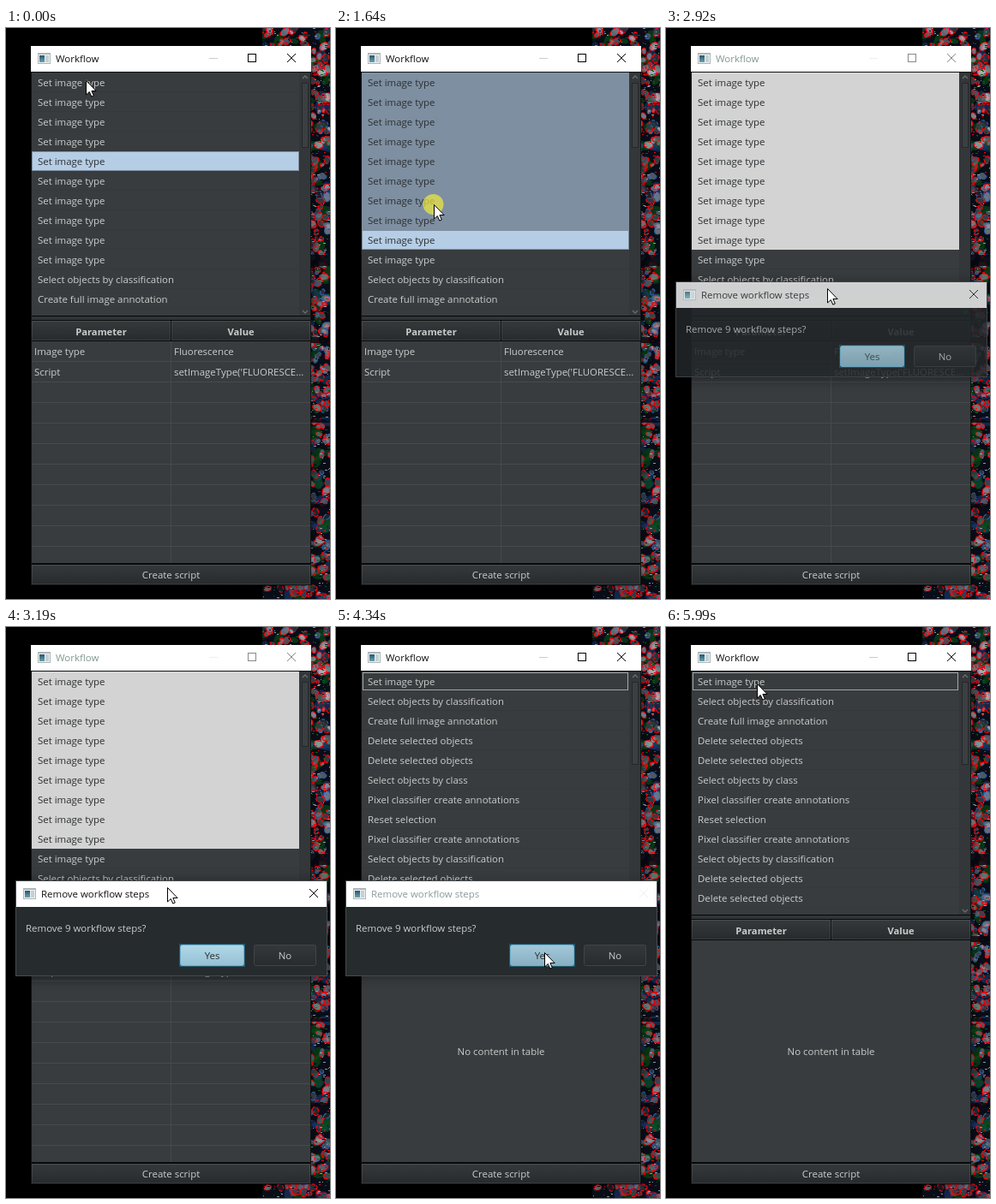
Recreate the animation shown at these times as an HTML page with a canvas. Size 378 px wide and 667 px high, loop 6030 ms.

```html
<!DOCTYPE html>
<html lang="en">
<head>
<meta charset="utf-8">
<title>Workflow</title>
<style>
html, body { margin: 0; width: 100%; height: 100%; overflow: hidden; background: #000; }
canvas { display: block; }
</style>
</head>
<body>
<canvas id="stage" width="378" height="667"></canvas>
<script>
const W = 378, H = 667, LOOP = 6030;
const ctx = document.getElementById('stage').getContext('2d');
const LIGHT = '#cbcccc', DARK = '#2c2f31', PANEL = '#383c3e';
const MUTED_BLUE = '#7e8fa1', BRIGHT_BLUE = '#b6cde6';

// Pointer positions [ms, x, y]; it moves in short steps between them.
const path = [
  [0, 93, 61], [140, 93, 61], [680, 111, 238], [1100, 111, 238], [1440, 114, 206],
  [2030, 114, 206], [2360, 184, 290], [2430, 187, 298], [2570, 187, 298], [2640, 188, 304],
  [3250, 188, 304], [3600, 226, 427], [3800, 236, 357], [3860, 236, 357], [4070, 243, 380],
  [4950, 243, 380], [5350, 191, 145], [5560, 221, 227], [5850, 92, 41], [5990, 106, 66], [6030, 106, 66]
];
const STEP = 67;
const clicks = [[140, 210], [880, 950], [1640, 1770], [2640, 2710], [4270, 4340]];

const remaining = [
  'Set image type', 'Select objects by classification', 'Create full image annotation',
  'Delete selected objects', 'Delete selected objects', 'Select objects by class',
  'Pixel classifier create annotations', 'Reset selection', 'Pixel classifier create annotations',
  'Select objects by classification', 'Delete selected objects', 'Delete selected objects',
  'Select objects by classification'
];
const initial = [...Array(9).fill('Set image type'), ...remaining].slice(0, 13);

const during = (t, from, to) => t >= from && t < to;
const clamp = v => Math.max(0, Math.min(1, v));

function pointerAt(t) {
  const i = path.findIndex(key => key[0] > t);
  const [t0, x0, y0] = path[i - 1], [t1, x1, y1] = path[i];
  const steps = Math.max(1, Math.round((t1 - t0) / STEP));
  const p = Math.floor((t - t0) / (t1 - t0) * steps) / steps;
  const e = p * p * (3 - 2 * p);
  return { x: Math.round(x0 + (x1 - x0) * e), y: Math.round(y0 + (y1 - y0) * e) };
}

function rect(x, y, w, h, fill) {
  ctx.fillStyle = fill;
  ctx.fillRect(x, y, w, h);
}

function frame(x, y, w, h, color) {
  ctx.strokeStyle = color;
  ctx.lineWidth = 1;
  ctx.strokeRect(x + .5, y + .5, w - 1, h - 1);
}

function line(color, width, ...points) {
  ctx.strokeStyle = color;
  ctx.lineWidth = width;
  ctx.beginPath();
  points.forEach(([x, y]) => ctx.lineTo(x, y));
  ctx.stroke();
}

function gradient(y, h, top, bottom) {
  const g = ctx.createLinearGradient(0, y, 0, y + h);
  g.addColorStop(0, top);
  g.addColorStop(1, bottom);
  return g;
}

function bevel(x, y, w, h) {
  rect(x, y, w, h, gradient(y, h, '#35393b', '#272b2d'));
  frame(x, y, w, h, gradient(y, h, '#4a4e50', '#373b3d'));
}

function label(text, x, middle, color = LIGHT, align = 'left', weight = '11.45px') {
  ctx.font = `${weight} "Open Sans", "Noto Sans", sans-serif`;
  ctx.textAlign = align;
  ctx.fillStyle = color;
  ctx.fillText(text, x, middle + 4);
}

function shadowed(x, y, w, h, fill, alpha, blur) {
  ctx.save();
  ctx.shadowColor = `rgba(0,0,0,${alpha})`;
  ctx.shadowBlur = blur;
  ctx.shadowOffsetY = 2;
  rect(x, y, w, h, fill);
  ctx.restore();
}

function closeCross(x, y, color) {
  line(color, 1, [x - 5, y - 5], [x + 5, y + 5]);
  line(color, 1, [x + 5, y - 5], [x - 5, y + 5]);
}

function appIcon(x, y) {
  rect(x, y, 15, 13, '#aeb6b9');
  rect(x + 1, y + 2, 13, 10, '#eef2f3');
  rect(x + 2, y + 3, 6, 8, gradient(y + 3, 8, '#28566f', '#69a3ad'));
  rect(x + 9, y + 3, 4, 8, '#c5d0d4');
}

// Fluorescence-like tissue in place of the picture behind the window.
function makeTissue() {
  const canvas = document.createElement('canvas');
  canvas.width = 79;
  canvas.height = H;
  const c = canvas.getContext('2d');
  let seed = 17;
  const random = (min, max) => {
    seed = (seed * 16807) % 2147483647;
    return min + (max - min) * seed / 2147483647;
  };
  const blob = (x, y, r, squash, fill) => {
    c.beginPath();
    c.ellipse(x, y, r, r * squash, random(0, 3), 0, 7);
    c.fillStyle = fill;
    c.fill();
  };
  c.fillStyle = '#080d18';
  c.fillRect(0, 0, 79, H);
  for (let i = 0; i < 260; i++)
    blob(random(0, 79), random(0, H), random(4, 10), .6, random(0, 1) < .55 ? '#08501499' : '#1b407c88');
  for (let i = 0; i < 640; i++) {
    const x = random(0, 79), y = random(0, H), r = random(2.5, 6);
    const v = Math.round(random(.15, y < 150 ? 1 : .75) * 225);
    blob(x, y, r, .7, `rgba(${v},${v + 8},${v + 20},.6)`);
    c.strokeStyle = random(0, 1) < .75 ? '#ff0008' : '#2f5da0';
    c.lineWidth = 1.2;
    c.setLineDash([random(3, 8), random(1, 5)]);
    c.stroke();
  }
  for (let i = 0; i < 1500; i++) {
    c.fillStyle = ['#ff0008', '#05080f', '#0b5a1a', '#8d99a6'][Math.floor(random(0, 4))];
    c.fillRect(Math.floor(random(0, 79)), Math.floor(random(0, H)), Math.ceil(random(0, 3)), 1);
  }
  for (const [y, h] of [[265, 13], [361, 7], [457, 4], [556, 4]]) {
    c.fillStyle = '#050810cc';
    c.fillRect(0, y, 79, h);
  }
  return canvas;
}
const tissue = makeTissue();

function drawTitleBar(active) {
  rect(29, 21, 327, 30, '#fff');
  appIcon(37, 29);
  label('Workflow', 58, 36, active ? '#111' : '#83988f');
  rect(237, 35, 10, 1, active ? '#ccc' : '#eee');
  const color = active ? '#000' : '#888';
  frame(282, 30, 10, 10, color);
  closeCross(333, 35, color);
}

function drawList(t, active, removed) {
  rect(30, 52, 325, 285, PANEL);
  const selectedTo = t < 880 ? 0 : 8;
  ctx.save();
  ctx.beginPath();
  ctx.rect(30, 52, 325, 285);
  ctx.clip();
  (removed ? remaining : initial).forEach((text, i) => {
    const y = 52 + 23 * i;
    const selected = !removed && (t < 140 ? i === 4 : i <= selectedTo);
    const focused = selected && i === (t < 140 ? 4 : selectedTo);
    if (selected) rect(30, y, 312, 23, active ? MUTED_BLUE : '#d3d3d3');
    else rect(30, y + 22, 312, 1, '#35393b');
    if (focused && active) rect(31, y + 1, 310, 21, BRIGHT_BLUE);
    label(text, 37, y + 12, selected ? DARK : LIGHT);
  });
  if (removed) frame(31, 53, 310, 21, '#a4a6a7');
  ctx.restore();

  rect(342, 52, 13, 285, '#333739');
  const thumb = removed ? 97 : 76;
  rect(345, 64, 8, thumb, '#3b3f41');
  frame(345, 64, 8, thumb, '#24282a');
  line('#686d70', 1.3, [346, 59], [349, 56], [352, 59]);
  line('#686d70', 1.3, [346, 330], [349, 333], [352, 330]);
}

function drawTable(removed) {
  rect(29, 336, 327, 1, '#050505');
  rect(29, 337, 327, 4, '#313537');
  rect(29, 341, 327, 25, '#080909');
  for (const [x, w, text] of [[30, 162, 'Parameter'], [193, 162, 'Value']]) {
    bevel(x, 342, w, 23);
    label(text, x + w / 2, 355, LIGHT, 'center', 'bold 11.2px');
  }
  rect(30, 366, 325, 260, PANEL);
  if (removed) label('No content in table', 192.5, 496, LIGHT, 'center');
  else {
    for (let y = 389; y < 626; y += 24) rect(30, y, 325, 1, '#464a4c');
    rect(192, 366, 1, 260, '#464a4c');
    label('Image type', 33, 378);
    label('Fluorescence', 196, 378);
    label('Script', 33, 402);
    label("setImageType('FLUORESCE...", 196, 402);
  }
  rect(29, 625, 327, 2, '#080909');
  bevel(30, 627, 325, 23);
  label('Create script', 192.5, 639, LIGHT, 'center');
}

function drawMenu(pointer) {
  shadowed(114, 206, 140, 114, '#363a3c', .6, 9);
  frame(114, 206, 140, 114, '#26292b');
  const items = [
    ['Copy commands', 211], ['Move up', 238], ['Move down', 263], ['Remove selected items', 291]
  ];
  for (const [text, y] of items) {
    const hover = pointer.y >= y && pointer.y <= y + 27 && (pointer.y < y + 25 || y === 263);
    if (hover) rect(115, y, 138, 26, MUTED_BLUE);
    label(text, 120, y + 12.5, hover ? DARK : LIGHT);
  }
  rect(115, 236, 138, 1, '#080909');
  rect(115, 289, 138, 1, '#080909');
}

function drawButton(x, w, text, fill, border, color) {
  ctx.beginPath();
  ctx.roundRect(x + .5, 371.5, w - 1, 24, 2);
  ctx.fillStyle = fill;
  ctx.fill();
  ctx.strokeStyle = border;
  ctx.lineWidth = 1;
  ctx.stroke();
  label(text, x + w / 2, 384, color, 'center');
}

function drawDialog(alpha, active, pointer) {
  ctx.save();
  ctx.globalAlpha = alpha;
  shadowed(11, 297, 364, 111, '#262b2d', active ? .55 : .3, 14);
  rect(12, 297, 362, 30, '#fff');
  frame(11, 296, 364, 112, '#474b4d');
  appIcon(20, 305);
  label('Remove workflow steps', 41, 312, active ? '#111' : '#8a9c98');
  closeCross(359, 311, active ? '#000' : '#f0f0f0');
  label('Remove 9 workflow steps?', 23, 352);
  const hover = pointer.x > 203 && pointer.x < 278 && pointer.y > 371 && pointer.y < 396;
  ctx.strokeStyle = '#24566c';
  ctx.lineWidth = 2;
  ctx.strokeRect(203, 371, 75, 25);
  const face = hover ? gradient(372, 24, '#a2c8d9', '#86afc1') : gradient(372, 24, '#afd8e8', '#95c0d3');
  drawButton(203, 75, 'Yes', face, '#6fb2ce', DARK);
  drawButton(289, 73, 'No', gradient(372, 24, '#34383a', '#272b2d'), '#414547', LIGHT);
  ctx.restore();
}

function drawPointer({ x, y }, pressed) {
  if (pressed) {
    ctx.beginPath();
    ctx.arc(x - .5, y, 12, 0, 7);
    ctx.fillStyle = 'rgba(238,232,65,.72)';
    ctx.fill();
  }
  const arrow = [[0, 0], [0, 16.5], [3.8, 13], [6.3, 18.6], [8.8, 17.5], [6.4, 12], [11.6, 12]];
  ctx.beginPath();
  arrow.forEach(([dx, dy]) => ctx.lineTo(x + dx + .5, y + dy + .5));
  ctx.closePath();
  ctx.fillStyle = '#fff';
  ctx.fill();
  ctx.strokeStyle = '#000';
  ctx.lineWidth = 1;
  ctx.stroke();
}

function draw(t) {
  const pointer = pointerAt(t);
  const active = !during(t, 2780, 4340), removed = t >= 4340;
  const dialog = clamp((t - 2710) / 270) * clamp((4620 - t) / 270);

  rect(0, 0, W, H, '#000');
  ctx.drawImage(tissue, 299, 0);
  shadowed(29, 21, 327, 630, '#1b1e20', active ? .45 : .3, active ? 12 : 8);
  drawTitleBar(active);
  drawList(t, active, removed);
  drawTable(removed);
  frame(29, 51, 327, 600, '#101314');
  if (during(t, 1770, 2710)) drawMenu(pointer);
  if (during(t, 2780, 4620)) drawDialog(dialog, !removed, pointer);
  drawPointer(pointer, clicks.some(([from, to]) => during(t, from, to)));
}

const start = performance.now();
function tick() {
  draw((performance.now() - start) % LOOP);
  requestAnimationFrame(tick);
}
tick();
</script>
</body>
</html>
```
